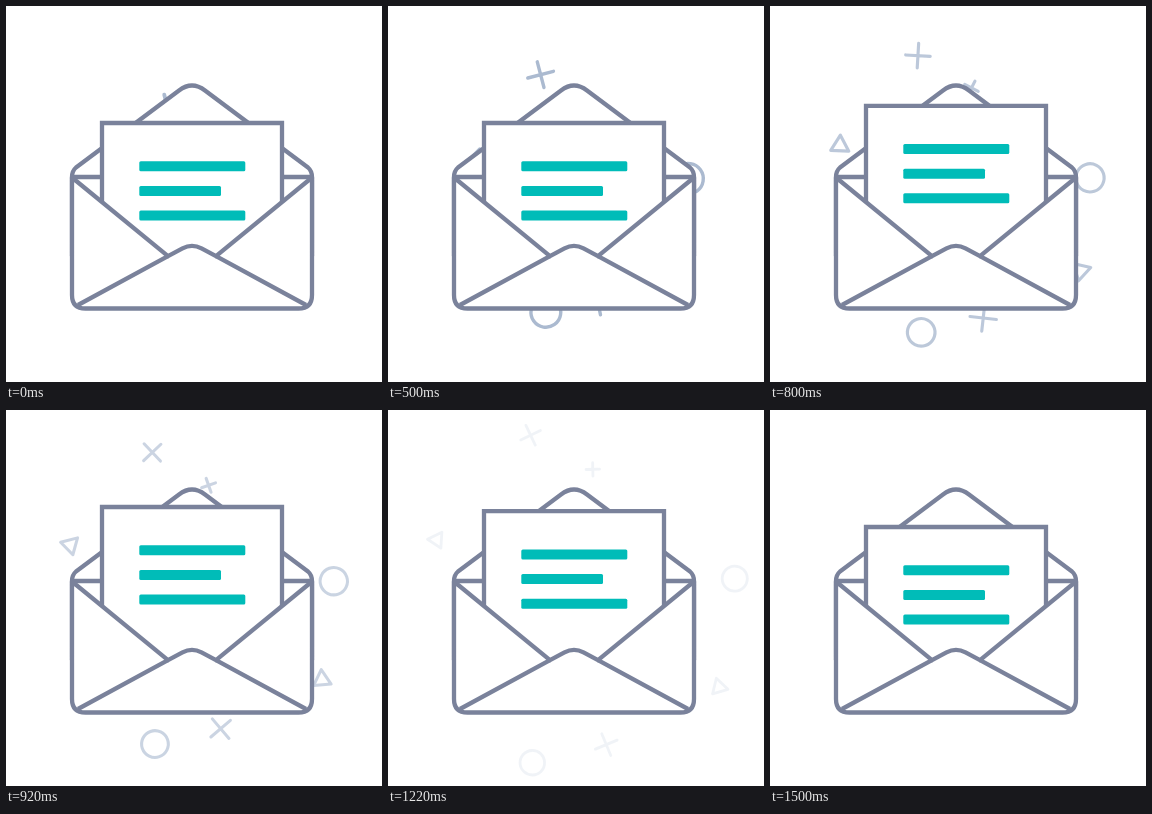
Recreate the animation shown at these times as an HTML page. Size 376 by 376 pixels, loop 2020 ms.

```html
<!DOCTYPE html>
<html lang="en">
<head>
<meta charset="utf-8">
<title>Open envelope</title>
<style>
  html, body { margin: 0; width: 100%; height: 100%; overflow: hidden; background: #fff; }
  svg { display: block; width: 100vw; height: 100vh; }
  #confetti { fill: none; stroke: #abbad0; stroke-width: 2.9; stroke-linecap: round; stroke-linejoin: round; }
  #envelope { fill: #fff; stroke: #7a829b; stroke-width: 4.3; stroke-linejoin: round; }
  #bars { fill: #00bcb8; stroke: none; }
</style>
</head>
<body>
<svg viewBox="0 0 376 376">
  <g id="confetti"></g>
  <g id="envelope">
    <path d="M66 171Q66 165 70 161.500L173 84.500Q186 74.500 199 84.500L302 161.500Q306 165 306 171ZV250H306V171"/>
    <g id="letter">
      <path stroke-linejoin="miter" d="M96 270V117H276V270"/>
      <g id="bars">
        <rect x="133.300" y="155.200" width="106" height="10" rx="1.500"/>
        <rect x="133.300" y="179.900" width="81.700" height="10" rx="1.500"/>
        <rect x="133.300" y="204.500" width="106" height="10" rx="1.500"/>
      </g>
    </g>
    <path d="M66 171.500L162 250.200 176.500 242.400Q186 237.200 195.500 242.400L210 250.200 306 171.500V289Q306 302.500 292.500 302.500H79.500Q66 302.500 66 289Z"/>
    <path fill="none" d="M72 299L162 250.200M300 299L210 250.200"/>
  </g>
</svg>
<script>
  const LOOP = 2020, END = 1500, PIVOT = 1100;
  const confetti = document.getElementById('confetti');
  const letter = document.getElementById('letter');

  const cross = r => `M${-r} 0H${r}M0 ${-r}V${r}`;
  const ring = r => `M${-r} 0a${r} ${r} 0 1 1 ${2 * r} 0a${r} ${r} 0 1 1 ${-2 * r} 0Z`;
  const triangle = 'M0 -7.2L8.3 7.2H-8.3Z';

  // x and y hold position, velocity and acceleration at PIVOT (per second)
  const pieces = [
    { d: cross(11.3), x: [144, -12, 4], y: [32, -57, 7], turn: 21 },
    { d: cross(7), x: [204, 7, -5], y: [65.7, -53, 4], turn: 45 },
    { d: cross(12.2), x: [216.8, 12, 0], y: [328.3, 53, -5], turn: 24 },
    { d: ring(12.7), x: [146, -15, 8], y: [345.3, 62, -5], turn: 0 },
    { d: ring(13), x: [339.2, 63, -4], y: [169.8, -9, -7], turn: 0 },
    { d: triangle, x: [54, -62, -4], y: [132.6, -25, 10], turn: 230 },
    { d: triangle, x: [326.2, 58, 0], y: [273.5, 35, -2], turn: 60 }
  ];
  for (const piece of pieces) {
    piece.node = document.createElementNS('http://www.w3.org/2000/svg', 'path');
    piece.node.setAttribute('d', piece.d);
    confetti.append(piece.node);
  }

  const ease = (t, from, to) => {
    const p = Math.min(1, Math.max(0, (t - from) / (to - from)));
    return (1 - Math.cos(Math.PI * p)) / 2;
  };
  const at = ([p, v, a], u) => p + v * u + a * u * u;

  function draw(t) {
    const u = (t - PIVOT) / 1000;
    for (const { node, x, y, turn } of pieces) {
      node.setAttribute('transform',
        `translate(${at(x, u)} ${at(y, u)}) rotate(${turn + 360 * u}) scale(${1 - 0.29 * u})`);
      node.setAttribute('opacity', t < END ? 1 - ease(t, 500, END) : 0);
    }
    const lift = 20 * (ease(t, 500, 900) - ease(t, 1100, END));
    letter.setAttribute('transform', `translate(0 ${-lift})`);
  }

  const start = performance.now();
  function tick() {
    draw((performance.now() - start) % LOOP);
    requestAnimationFrame(tick);
  }
  tick();
</script>
</body>
</html>
```
